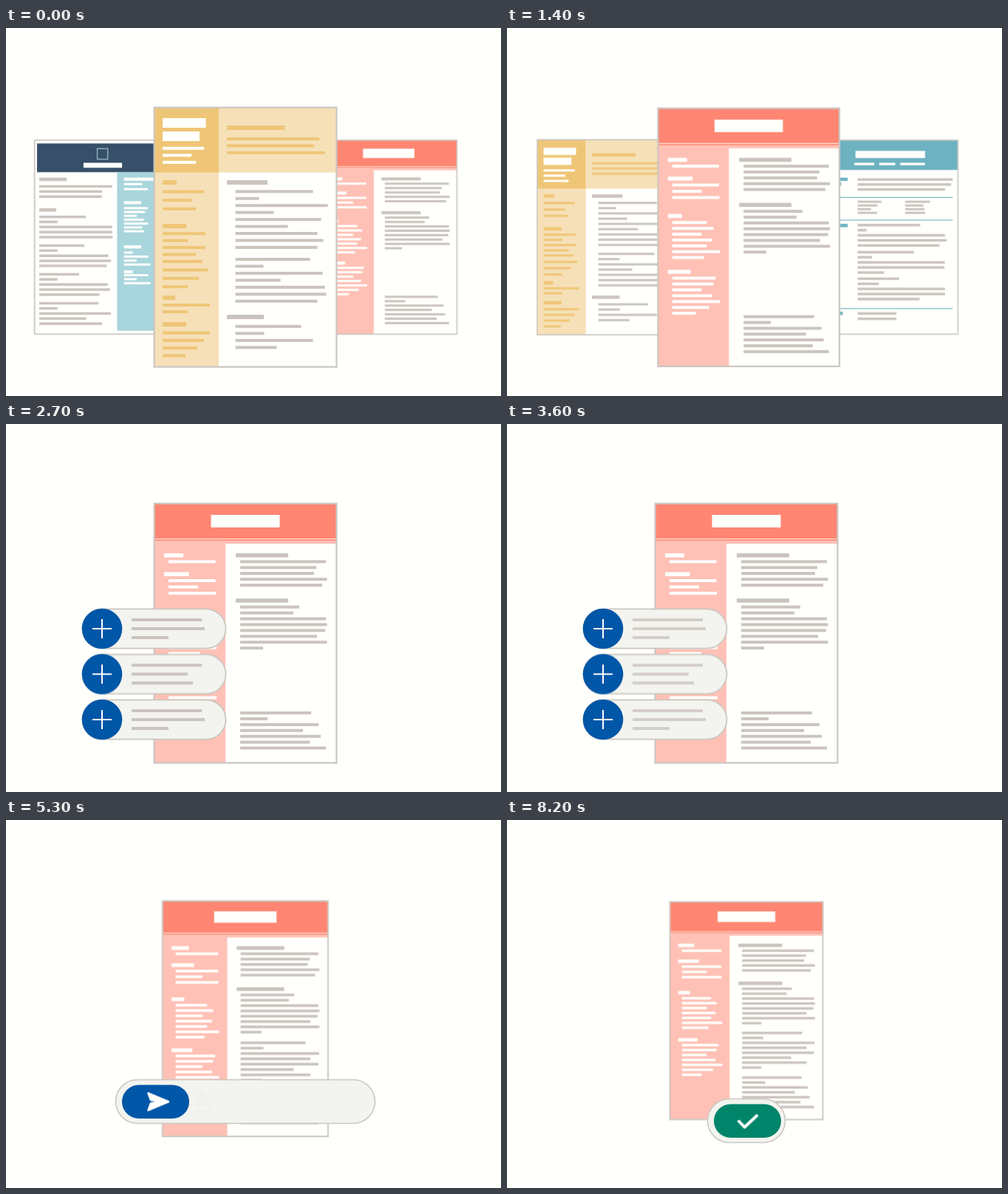
An HTML page that plays this animation: 670x498 px, repeating every 8.3 s.

```html
<!DOCTYPE html>
<html lang="en">
<head>
<meta charset="utf-8">
<title>Resume builder</title>
<style>
html, body { margin: 0; width: 100%; height: 100%; overflow: hidden; background: #fffffc; }
svg { position: absolute; left: 0; top: 0; overflow: hidden; }
.page { width: 252px; height: 356px; left: -2px; top: -2px; transform-origin: 2px 2px; }
#ui { width: 670px; height: 498px; z-index: 9; }
.icon { fill: none; stroke: #cbc4be; stroke-width: 2.8; stroke-linecap: round; stroke-linejoin: round; }
.solid { fill: #cbc4be; stroke: none; }
</style>
</head>
<body>
<svg id="ui" viewBox="0 0 670 498">
  <g id="pills"></g>
  <g id="toolbar">
    <rect id="bar" x="144.5" y="377.5" width="359" height="59" rx="29.5" fill="#f3f4ef" stroke="#cbc6c0" stroke-width="1.5"/>
    <g class="icon">
      <text x="281" y="413" text-anchor="middle" class="solid" font-family="'Noto Serif', serif" font-weight="700" font-size="27">A</text>
      <path d="M270.5 420.3H291.5" stroke-width="3"/>
    </g>
    <g class="icon"><path d="M331.8 400V412.5a6.2 6.2 0 0 1-12.4 0V399.5a4.2 4.2 0 0 1 8.4 0V411.5a2 2 0 0 1-4 0V401" stroke-width="2.5"/></g>
    <g class="icon"><path d="M367 400.3h-4.5a6.7 6.7 0 0 0 0 13.4h4.5M373 400.3h4.5a6.7 6.7 0 0 1 0 13.4h-4.5M364.5 407h11" stroke-width="3.2"/></g>
    <g class="icon">
      <circle cx="414.5" cy="407" r="11.2"/>
      <circle class="solid" cx="410.5" cy="403.8" r="1.9"/><circle class="solid" cx="418.5" cy="403.8" r="1.9"/>
      <path class="solid" d="M408 409.5h13a6.8 6.8 0 0 1-13 0z"/>
    </g>
    <g class="icon">
      <rect x="447.6" y="397.2" width="22.5" height="19.8" rx="2.5"/>
      <path class="solid" d="M450 414l4.800-6.200 3.700 4.400 4.800-6.700 5.700 8.500z"/>
      <circle class="solid" cx="453.5" cy="402.5" r="1.8"/>
    </g>
    <g id="button">
      <rect id="face" x="153" y="384.5" width="91" height="45.5" rx="22.7" fill="#0056a7"/>
      <g transform="translate(198.5 407.2)">
        <path id="plane" d="M-11.5-11.5L16 0L-11.5 11.5L-8 2.200L5 0L-8-2.200z" fill="#fff" stroke="#fff" stroke-width="2.6" stroke-linejoin="round"/>
        <path id="check" d="M-11.5 0.5L-4 8.5L12.5-7" pathLength="1" stroke-dasharray="1 2" fill="none" stroke="#fff" stroke-width="4" stroke-linecap="round" stroke-linejoin="round"/>
      </g>
    </g>
  </g>
</svg>
<script>
const LOOP = 8300;
const GREY = '#cbc4be', WHITE = '#fffffc', EDGE = '#cbc6c0';
const IN_OUT = 'cubic-bezier(.6,0,.3,1)', OUT = 'ease-out', STEP = 'step-end';
const $ = id => document.getElementById(id);

function add(parent, tag, attrs = {}) {
  const el = document.createElementNS('http://www.w3.org/2000/svg', tag);
  for (const k in attrs) el.setAttribute(k, attrs[k]);
  return parent.appendChild(el);
}
const box = (p, x, y, width, height, fill) => add(p, 'rect', { x, y, width, height, fill });

// a column of lines of text: one width per line
const lines = (p, x, y, step, fill, widths, h = 4) =>
  widths.map((w, i) => box(p, x, y + i * step, w, h, fill));

// steps: [ms, properties, easing to the next step]
function play(el, steps) {
  const all = [[0, steps[0][1]], ...steps, [LOOP, steps[steps.length - 1][1]]];
  el.animate(all.map(([ms, props, easing = 'linear']) => ({ ...props, offset: ms / LOOP, easing })),
    { duration: LOOP, iterations: Infinity });
}
const at = (x, y, s = 1) => ({ transform: `translate(${x}px,${y}px) scale(${s})` });
const move = (x, y = 0) => ({ transform: `translate(${x}px,${y}px)` });
const show = opacity => ({ opacity });

// pages are drawn in a 248 x 352 sheet whose corner is 200,107
function page(draw, z) {
  const svg = add(document.body, 'svg', { class: 'page', viewBox: '198 105 252 356' });
  svg.style.zIndex = z;
  box(svg, 200, 107, 248, 352, WHITE);
  draw(svg);
  add(svg, 'rect', { x: 200.6, y: 107.6, width: 246.8, height: 351, fill: 'none', stroke: EDGE, 'stroke-width': 2.2 });
  return svg;
}

function drawYellow(p) {
  const dark = '#efc677', light = '#f6e0b8';
  box(p, 201, 108, 87, 350, light);
  box(p, 201, 108, 87, 87.5, dark);
  box(p, 288, 108, 159, 87.5, light);
  box(p, 212, 122, 58.5, 13, WHITE);
  box(p, 212, 140, 50, 13, WHITE);
  lines(p, 212, 160.8, 9.5, WHITE, [56, 39, 45]);
  box(p, 299, 132, 78.5, 6, dark);
  lines(p, 299, 148, 9.4, dark, [125, 118, 133]);
  [[206, 19], [265, 32], [362, 17], [398, 32]].forEach(([y, w]) => box(p, 212, y, w, 6, dark));
  lines(p, 212, 219.5, 11.6, dark, [56, 39, 45]);
  lines(p, 212, 276.3, 9.4, dark, [58, 34, 58, 45, 54]);
  lines(p, 212, 325.5, 11.3, dark, [61, 49, 34]);
  lines(p, 212, 373, 9, dark, [64, 34]);
  lines(p, 212, 410.5, 10.3, dark, [64, 56, 47, 31]);
  box(p, 299, 206, 55, 6, GREY);
  lines(p, 310.5, 219.3, 9.45, GREY, [105, 32, 125, 52, 116, 71, 111, 119, 111]);
  lines(p, 310.5, 311, 9.45, GREY, [101, 38, 118, 61, 121, 123, 111]);
  box(p, 299, 388, 50, 6, GREY);
  lines(p, 310.5, 401.8, 9.5, GREY, [89, 39, 105, 56]);
}

let typed;
function drawPink(p) {
  const dark = '#ff8672', light = '#ffc1b6';
  box(p, 201, 108, 246, 54, light);
  box(p, 201, 108, 246, 47, dark);
  box(p, 201, 155, 246, 1, '#ffe3dc');
  box(p, 201, 156.3, 246, 1.5, dark);
  box(p, 201, 158, 96, 300, light);
  box(p, 277.5, 123, 93, 17, WHITE);
  [[175, 26], [200.5, 33.5], [251.3, 19], [327.3, 31]].forEach(([y, w]) => box(p, 214, y, w, 5.5, WHITE));
  lines(p, 220, 184.3, 8, WHITE, [63.5]);
  lines(p, 220, 210, 8.5, WHITE, [63.5, 40, 64]);
  lines(p, 220, 261, 7.93, WHITE, [47, 56, 40, 54, 47, 65, 43]);
  lines(p, 220, 336.6, 7.97, WHITE, [59, 56, 40, 54, 65, 50, 32]);
  box(p, 311, 175, 71, 5.5, GREY);
  lines(p, 317, 184.3, 7.95, GREY, [116, 103, 100, 117.5, 111]);
  box(p, 311, 236.2, 71, 5.5, GREY);
  lines(p, 317, 245.7, 7.93, GREY, [80, 72, 116, 117.5, 115, 104, 117.5, 31]);
  typed = lines(p, 317, 317, 7.97, GREY, [97, 34, 117, 104, 116, 79, 104, 31]);
  lines(p, 317, 389, 7.92, GREY, [96, 37, 106, 85, 109, 94, 116]);
}

function drawTeal(p) {
  const teal = '#6cb2c1';
  box(p, 201, 108, 246, 53.5, teal);
  box(p, 262, 127, 126, 13, WHITE);
  [[260, 36], [305, 29], [343, 45]].forEach(([x, w]) => box(p, x, 148.5, w, 4.5, WHITE));
  [[175.5, 34], [184, 22], [259, 34], [418, 25]].forEach(([y, w]) => box(p, 214, y, w, 6, teal));
  [210.5, 251.5, 411.5].forEach(y => box(p, 214, y, 224, 1.5, teal));
  lines(p, 266, 176.5, 9, GREY, [172, 169, 158], 4.6);
  lines(p, 266, 217, 6.7, GREY, [43, 36, 24, 35]);
  lines(p, 352, 217, 6.7, GREY, [45, 33, 35, 36]);
  lines(p, 266, 259, 9.2, GREY, [113, 16, 158, 161, 148], 4.6);
  lines(p, 266, 308, 9.2, GREY, [102, 26, 158, 157, 48], 4.6);
  lines(p, 266, 356, 9.2, GREY, [75, 38, 158, 158, 112], 4.6);
  lines(p, 266, 419, 9.5, GREY, [70, 70], 4.6);
}

function drawNavy(p) {
  box(p, 205, 113.5, 239, 52, '#374f69');
  box(p, 350, 165.5, 94, 287, '#a9d5dc');
  add(p, 'rect', { x: 314, y: 123, width: 19, height: 19, fill: 'none', stroke: '#a9d5dc', 'stroke-width': 1.5 });
  box(p, 289, 148.5, 70, 9, WHITE);
  box(p, 209, 175.5, 50, 6, GREY);
  lines(p, 209, 189, 9.2, GREY, [132, 114, 113], 4.6);
  box(p, 209, 231, 31, 6, GREY);
  lines(p, 209, 244, 9.2, GREY, [84, 33, 132, 132, 133], 4.6);
  lines(p, 209, 296, 9.2, GREY, [82, 33, 125, 130, 122], 4.6);
  lines(p, 209, 348, 9.2, GREY, [72, 33, 124, 128, 109], 4.6);
  lines(p, 209, 400.5, 9.2, GREY, [107, 33, 130, 85, 114], 4.6);
  [[175.5, 54], [218, 31], [298, 31], [343, 16]].forEach(([y, w]) => box(p, 362.5, y, w, 5.5, WHITE));
  lines(p, 362.5, 185, 9.3, WHITE, [33, 43]);
  lines(p, 362.5, 228.5, 7, WHITE, [43, 38, 23, 36, 44, 33, 36]);
  lines(p, 362.5, 309, 7.2, WHITE, [16, 44, 23, 48]);
  lines(p, 362.5, 350, 7.2, WHITE, [44, 23, 48]);
}

const teal = page(drawTeal, 0), navy = page(drawNavy, 1);
const yellow = page(drawYellow, 3), pink = page(drawPink, 2);

// carousel
const side = x => at(x, 151.3, .748), left = x => at(x, 150.7, .752);
play(navy, [[100, side(38.2), IN_OUT], [800, side(232)]]);
play(navy, [[0, show(1), STEP], [800, show(0)]]);
play(yellow, [
  [100, at(200, 107), IN_OUT], [1100, left(40.5)],
  [1400, left(40.5), 'ease-in-out'], [1750, left(26), 'ease-in'],
  [2100, left(49), OUT], [2400, left(232)]]);
play(yellow, [[0, { zIndex: 3 }, STEP], [450, { zIndex: 1 }, STEP]]);
play(yellow, [[0, show(1), STEP], [2400, show(0)]]);
play(teal, [
  [100, side(232), IN_OUT], [900, side(425.2)],
  [1400, side(425.2), 'ease-in-out'], [1750, side(438), 'ease-in'],
  [2100, side(415), OUT], [2400, side(232)]]);
play(teal, [[0, show(1), STEP], [2400, show(0)]]);
play(pink, [
  [100, side(425.2), IN_OUT], [900, at(203.8, 108, .995)],
  [1400, at(203.8, 108, .995), 'ease-in-out'], [1800, at(200, 107)],
  [4900, at(200, 107), 'ease-in'], [5300, at(211.3, 109, .908), OUT], [5700, at(220, 110.3, .839)]]);

// suggestions
[[95, 99, 50], [95, 76, 83], [95, 99, 50]].forEach((widths, i) => {
  const g = add($('pills'), 'g', { transform: `translate(130 ${277 + i * 61.5})` });
  const body = add(g, 'rect', { x: -26.5, y: -26.7, width: 194, height: 53.4, rx: 26.7, fill: '#f3f4ef', stroke: EDGE, 'stroke-width': 1.8 });
  const text = add(g, 'g');
  lines(text, 40, -14, 12, GREY, widths);
  const knob = add(g, 'g');
  add(knob, 'circle', { r: 27.3, fill: '#0056a7' });
  add(knob, 'path', { d: 'M-13 0H13M0-13V13', stroke: '#fff', 'stroke-width': 2 });

  const on = 2200 + i * 60, size = s => ({ transform: `scale(${s})` }), wide = w => ({ width: w + 'px' });
  const press = i === 1 ? [[3200, size(1)], [3350, size(1.2)], [3500, size(1)]] : [];
  play(knob, [[on, size(0), OUT], [on + 200, size(1)], ...press, [3800, size(1), 'ease-in'], [4050, size(0)]]);
  play(body, [[on + 130, wide(53), OUT], [on + 350, wide(194)], [3600, wide(194), 'ease-in'], [3850, wide(53)]]);
  play(body, [[on + 130, show(0)], [on + 160, show(1)], [3800, show(1)], [3850, show(0)]]);
  play(text, [[on + 230, show(0)], [on + 360, show(1)], [3580, show(1)], [3680, show(0)]]);
});

// typing
typed.forEach((line, i) => {
  const start = 4267 + i * 72;
  play(line, [[start, { width: '0px' }], [start + 72, { width: line.getAttribute('width') + 'px' }]]);
});

// toolbar opens, then folds back to its button
const span = x => ({ x: x + 'px', width: 648 - 2 * x + 'px' });
const follow = x => move(x - 144.5);
const sides = [[4950, 271.5, OUT], [5300, 148.5, OUT], [5600, 144.5], [6850, 144.5, IN_OUT], [7200, 271.5]];
play($('bar'), sides.map(([ms, x, e]) => [ms, span(x), e]));
play($('button'), sides.map(([ms, x, e]) => [ms, follow(x), e]));
play($('toolbar'), [[4880, move(0, 27), OUT], [5300, move(0, -26), 'ease-in-out'], [5700, move(0, 0)]]);
play($('toolbar'), [[4880, show(0)], [5000, show(1)]]);
document.querySelectorAll('#toolbar > .icon').forEach((icon, i) => {
  const on = 5280 + i * 150;
  play(icon, [[on, move(-17), OUT], [on + 300, move(0)]]);
  play(icon, [[on, show(0)], [on + 250, show(1)], [6820, show(1)], [6980, show(0)]]);
});

// send and confirm
const fly = (x, y, r) => ({ transform: `translate(${x}px,${y}px) rotate(${r}deg)` });
play($('plane'), [
  [5300, fly(1.5, 0, 0)], [5700, fly(0, 0, 0)], [6400, fly(0, 0, 0), 'ease-in-out'],
  [6800, fly(0, 0, -11), 'ease-in'], [7100, fly(24, -5, -11)]]);
play($('plane'), [[6900, show(1)], [7100, show(0)]]);
play($('face'), [[7220, { fill: '#0056a7' }], [7500, { fill: '#00856a' }]]);
play($('check'), [[7300, { strokeDashoffset: 1 }, OUT], [7540, { strokeDashoffset: 0 }]]);
play($('check'), [[7300, show(0)], [7330, show(1)]]);
</script>
</body>
</html>
```
